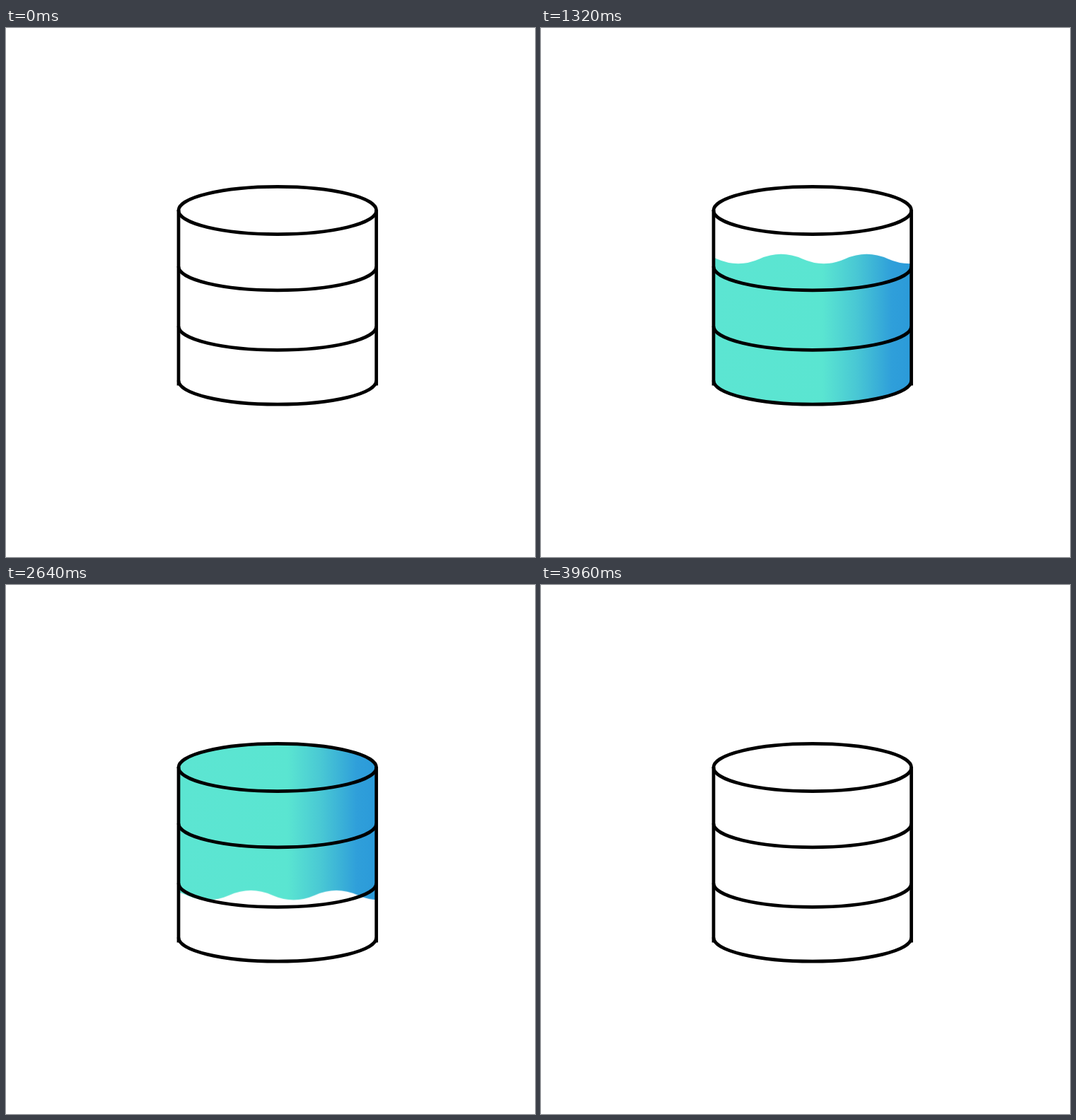
These frames come from a looping animation (748 px wide and 748 px high, 4.04 s). An HTML page without scripts:

```html
<!DOCTYPE html>
<html lang="en">
<head>
<meta charset="utf-8">
<title>Filling cylinder</title>
<style>
  html, body { margin: 0; width: 100%; height: 100%; overflow: hidden; background: #fff; }
  svg { display: block; width: 748px; height: 748px; }
  .outline { fill: none; stroke: #000; stroke-width: 4.7; }
  /* One step per 40 ms; the short lead keeps steps clear of rounding. */
  .cover { fill: #fff; fill-rule: evenodd; animation: drift 4040ms steps(101) -1ms infinite; }
  @keyframes drift {
    from { transform: translate(0, 0); }
    to { transform: translate(391.2px, -670.6px); }
  }
</style>
</head>
<body>
<svg viewBox="0 0 748 748">
  <defs>
    <linearGradient id="liquid" gradientUnits="userSpaceOnUse" x1="244" y1="0" x2="524" y2="0">
      <stop offset="0" stop-color="#5ce5d2"/>
      <stop offset=".55" stop-color="#5ae5d1"/>
      <stop offset=".72" stop-color="#49c8d4"/>
      <stop offset=".9" stop-color="#2f9fda"/>
      <stop offset="1" stop-color="#2b9ad9"/>
    </linearGradient>
    <path id="body" d="M244 258A139.85 33.6 0 0 1 523.7 258V498.6A139.85 33.6 0 0 1 244 498.6Z"/>
    <path id="ring" d="M244 0A139.85 33.6 0 0 0 523.7 0"/>
    <clipPath id="inside"><use href="#body"/></clipPath>
  </defs>

  <g clip-path="url(#inside)">
    <use href="#body" fill="url(#liquid)"/>
    <!-- White sheet with a wavy band cut out; the band rises through the cylinder. -->
    <path class="cover" d="M-1500-1500h4000v4000h-4000z
      M-302.75 545.5q30.25-13.4 60.5 0
      t60.5 0t60.5 0t60.5 0t60.5 0t60.5 0t60.5 0t60.5 0t60.5 0t60.5 0t60.5 0t60.5 0t60.5 0t60.5 0
      v331.2q-30.25 13.4-60.5 0
      t-60.5 0t-60.5 0t-60.5 0t-60.5 0t-60.5 0t-60.5 0t-60.5 0t-60.5 0t-60.5 0t-60.5 0t-60.5 0t-60.5 0t-60.5 0z"/>
  </g>

  <g class="outline">
    <ellipse cx="383.85" cy="258" rx="139.85" ry="33.6"/>
    <use href="#ring" y="337.2"/>
    <use href="#ring" y="421.7"/>
    <use href="#ring" y="498.6"/>
    <path d="M244 257V505.5M523.7 257V505.5"/>
  </g>
</svg>
</body>
</html>
```
